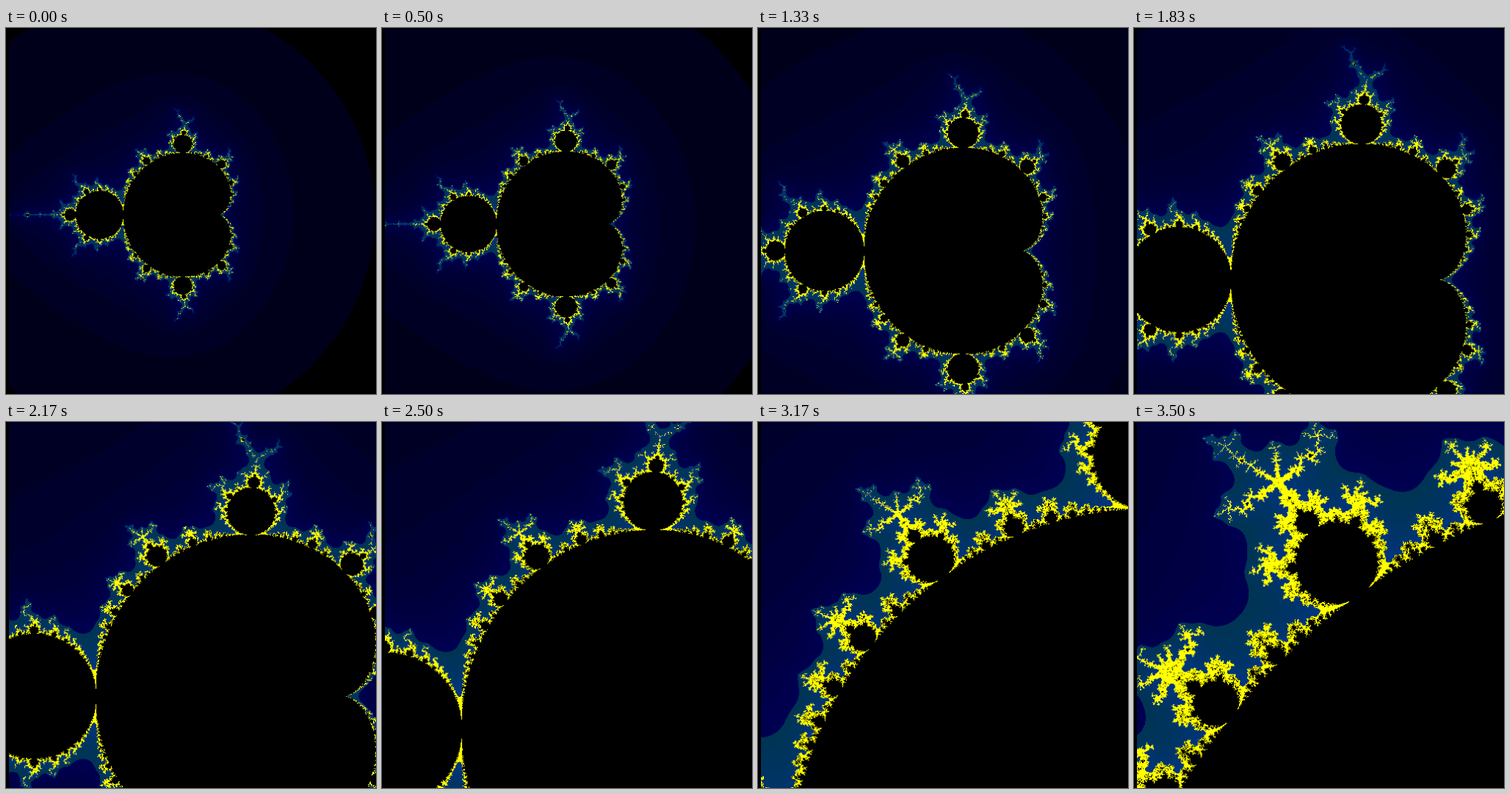
Animation of 500x494 px, one loop 3670 ms. Source, as an HTML page with a canvas:

```html
<!DOCTYPE html>
<html lang="en">
<head>
<meta charset="utf-8">
<title>Mandelbrot zoom</title>
<style>
  html, body { margin: 0; width: 100%; height: 100%; overflow: hidden; background: #000; }
  canvas { display: block; width: 500px; height: 494px; }
</style>
</head>
<body>
<canvas id="stage" width="500" height="494"></canvas>
<script>
const stage = document.getElementById('stage');
const ctx = stage.getContext('2d');
const LOOP = 3670, STEP = 1000 / 6, LAST_STEP = 21;
// The plot is computed slightly larger than the stage and scaled down smoothly.
const WIDTH = 504, HEIGHT = 498;
const PLOT_SIZE = 500, PLOT_X = 4, PLOT_Y = 1;
const MAX_ITERATIONS = 100, BAILOUT = 30;

// Starts at z = c, so points far outside count 0.
function escapeCount(cx, cy) {
  let x = cx, y = cy;
  for (let n = 0; n < MAX_ITERATIONS; n++) {
    const real = x * x - y * y + cx;
    y = 2 * x * y + cy;
    x = real;
    if (x * x + y * y > BAILOUT) return n;
  }
  return MAX_ITERATIONS;
}

function colorOf(count) {
  const blue = 255 * Math.sqrt(count / MAX_ITERATIONS);
  if (count === MAX_ITERATIONS) return [0, 0, 0];
  if (count < 11) return [0, 0, blue];
  if (count < 28) return [0, 52, blue];
  return [255, 255, 0];
}

const palette = Array.from({ length: MAX_ITERATIONS + 1 }, (_, i) => colorOf(i));

// The left and top edges close in by 0.05 per zoom level, the others by 0.09.
function render(level) {
  const canvas = document.createElement('canvas');
  canvas.width = WIDTH;
  canvas.height = HEIGHT;
  const plot = canvas.getContext('2d');
  const image = plot.createImageData(WIDTH, HEIGHT);
  const left = -2 + 0.05 * level;
  const top = 2 - 0.05 * level;
  const unit = (4 - 0.14 * level) / PLOT_SIZE;
  for (let py = 0; py < HEIGHT; py++) {
    const cy = top - (py - PLOT_Y) * unit;
    for (let px = 0; px < WIDTH; px++) {
      const count = px < PLOT_X ? 0 : escapeCount(left + (px - PLOT_X) * unit, cy);
      const p = 4 * (py * WIDTH + px);
      const [r, g, b] = palette[count];
      image.data[p] = r;
      image.data[p + 1] = g;
      image.data[p + 2] = b;
      image.data[p + 3] = 255;
    }
  }
  plot.putImageData(image, 0, 0);
  return canvas;
}

// The zoom skips every fourth level at first, then slows to one level per step.
function levelAt(time) {
  const step = Math.min(LAST_STEP, Math.floor((time % LOOP + 3.4) / STEP));
  return 1 + Math.min(Math.floor((4 * step + 1) / 3), step + 4);
}

const cache = new Map();
let shown = 0;

function draw() {
  const level = levelAt(performance.now());
  if (level !== shown) {
    if (!cache.has(level)) cache.set(level, render(level));
    ctx.drawImage(cache.get(level), 0, 0, stage.width, stage.height);
    shown = level;
  }
  requestAnimationFrame(draw);
}
draw();
</script>
</body>
</html>
```
